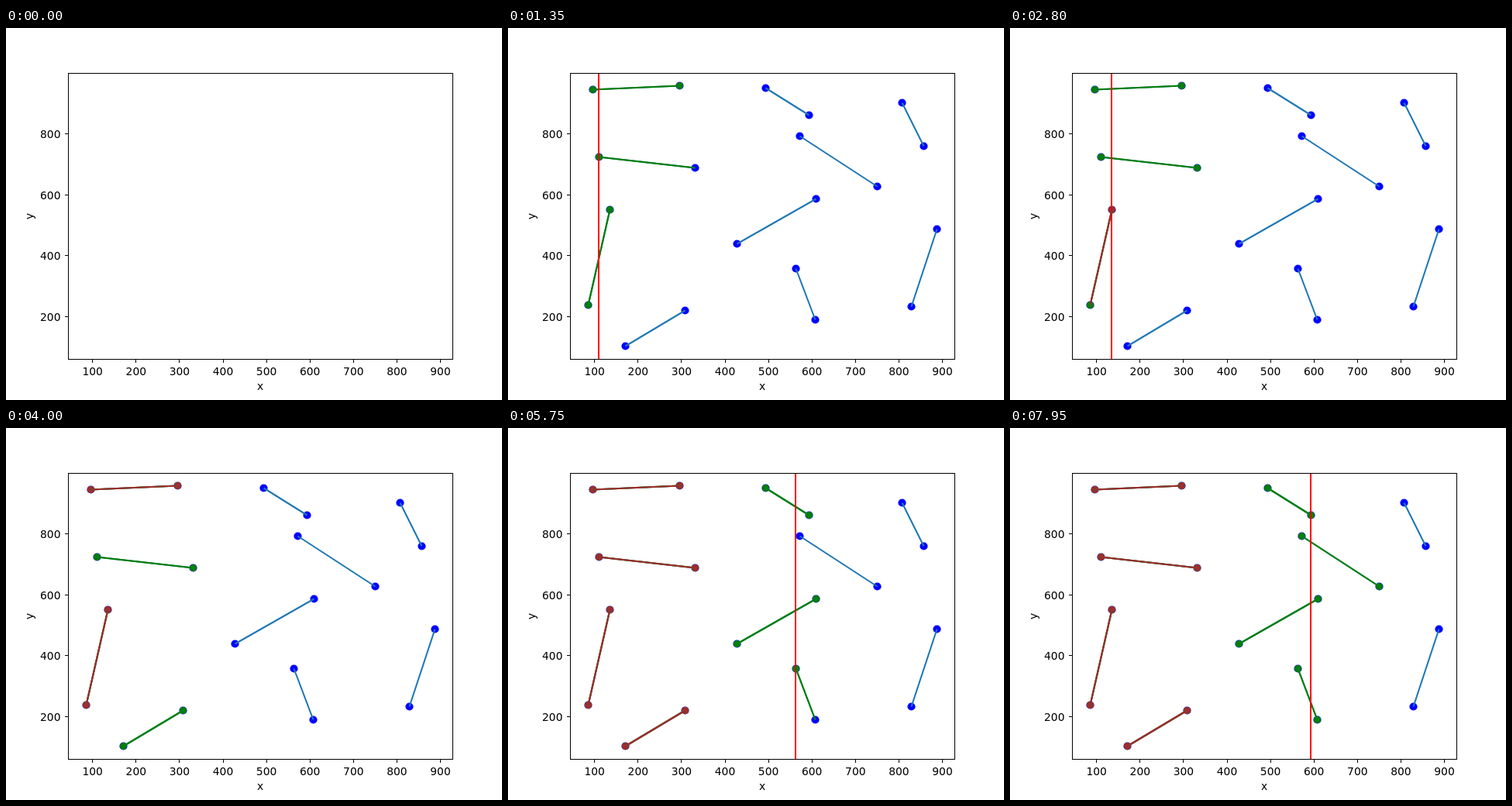
An HTML page with a canvas that plays this animation: 640x480 px, repeating every 8 s.

```html
<!DOCTYPE html>
<html lang="en">
<head>
<meta charset="utf-8">
<title>Sweep line</title>
<style>
  html, body { margin: 0; width: 100%; height: 100%; overflow: hidden; background: #fff; }
  canvas { display: block; }
</style>
</head>
<body>
<canvas id="stage" width="640" height="480"></canvas>
<script>
const ctx = document.getElementById('stage').getContext('2d');
const STEP_MS = 50, STEP_COUNT = 160;
const BOX = { left: 80.5, right: 576.5, top: 58.5, bottom: 427.5 };
const COLORS = { point: '#0000ff', segment: '#1f77b4', active: '#008000',
                 done: '#a52a2a', checked: '#ffa500', sweep: '#ff0000' };

// Each segment: left end, right end, in stage pixels.
const segments = [
  [103, 357, 131, 234], [109, 79, 221, 74], [117, 166, 241, 180],
  [151, 410, 228, 364], [295, 278, 397, 220], [332, 77, 388, 112],
  [371, 310, 396, 376], [376, 139, 476, 204], [508, 96, 536, 152],
  [520, 359, 553, 259]
].map(([x1, y1, x2, y2]) => ({ a: { x: x1 + .5, y: y1 + .5 }, b: { x: x2 + .5, y: y2 + .5 } }));

const dots = (points, color, r = 4.5) => ({ kind: 'dots', points, color, r });
const lines = (list, color) => ({ kind: 'lines', list, color });

const steps = [];
const add = figure => { steps.push({ figure, on: true }); return figure; };
const remove = figure => steps.push({ figure, on: false });

function paint(segment, color, fromRight = false) {
  const { a, b } = segment;
  return [dots([fromRight ? b : a], color), lines([segment], color),
          dots([fromRight ? a : b], color)].map(add);
}

function check(first, second) {
  [first, second].flatMap(s => paint(s, COLORS.checked)).forEach(remove);
}

function recordSweep() {
  add(dots(segments.flatMap(s => [s.a, s.b]), COLORS.point, 5.1));
  add(lines(segments, COLORS.segment));

  const events = segments
    .flatMap(s => [{ x: s.a.x, s, start: true }, { x: s.b.x, s, start: false }])
    .sort((p, q) => p.x - q.x);
  const yAt = ({ a, b }, x) => a.y + (b.y - a.y) * (x - a.x) / (b.x - a.x);
  const active = [];

  for (const { x, s, start } of events) {
    const px = Math.floor(x);
    const sweep = add(lines([{ a: { x: px, y: BOX.top }, b: { x: px, y: BOX.bottom } }], COLORS.sweep));
    paint(s, start ? COLORS.active : COLORS.done, !start);
    remove(sweep);

    if (start) active.push(s);
    active.sort((p, q) => yAt(p, x) - yAt(q, x));
    const i = active.indexOf(s), above = active[i - 1], below = active[i + 1];
    if (start) {
      if (below) check(below, s);
      if (above) check(above, s);
    } else {
      active.splice(i, 1);
      if (above && below) check(above, below);
    }
  }
}

function strokeLine(x1, y1, x2, y2) {
  ctx.beginPath();
  ctx.moveTo(x1, y1);
  ctx.lineTo(x2, y2);
  ctx.stroke();
}

function drawFigure({ kind, points, list, color, r }) {
  if (kind === 'dots') {
    ctx.fillStyle = color;
    for (const p of points) {
      ctx.beginPath();
      ctx.arc(p.x, p.y, r, 0, 2 * Math.PI);
      ctx.fill();
    }
  } else {
    ctx.strokeStyle = color;
    ctx.lineWidth = color === COLORS.sweep ? 2 : 2.08;
    for (const { a, b } of list) strokeLine(a.x, a.y, b.x, b.y);
  }
}

function drawAxes() {
  const { left, right, top, bottom } = BOX;
  ctx.strokeStyle = ctx.fillStyle = '#000';
  ctx.lineWidth = 1;
  ctx.strokeRect(left, top, right - left, bottom - top);
  ctx.font = '13.89px "DejaVu Sans", sans-serif';

  ctx.textAlign = 'center';
  for (let i = 0; i < 9; i++) {
    const x = 111.7 + 56.1 * i, tick = Math.floor(x) + .5;
    strokeLine(tick, bottom, tick, bottom + 4.5);
    ctx.fillText(100 * (i + 1), x, 448);
  }
  ctx.fillText('x', 328, 467);

  ctx.textAlign = 'right';
  for (let i = 0; i < 4; i++) {
    const tick = Math.floor(372.6 - 78.8 * i) + .5;
    strokeLine(left - 4.5, tick, left, tick);
    ctx.fillText(200 * (i + 1), 70.5, tick + 5.5);
  }

  ctx.save();
  ctx.translate(35, 243);
  ctx.rotate(-Math.PI / 2);
  ctx.textAlign = 'center';
  ctx.fillText('y', 0, 0);
  ctx.restore();
}

function draw(count) {
  const shown = new Set();
  for (const { figure, on } of steps.slice(0, count)) {
    if (on) shown.add(figure); else shown.delete(figure);
  }
  ctx.fillStyle = '#fff';
  ctx.fillRect(0, 0, 640, 480);
  for (const kind of ['dots', 'lines']) {
    for (const figure of shown) if (figure.kind === kind) drawFigure(figure);
  }
  drawAxes();
}

function tick() {
  draw(Math.floor((performance.now() - startTime) / STEP_MS) % STEP_COUNT);
  requestAnimationFrame(tick);
}

recordSweep();
const startTime = performance.now();
tick();
</script>
</body>
</html>
```
